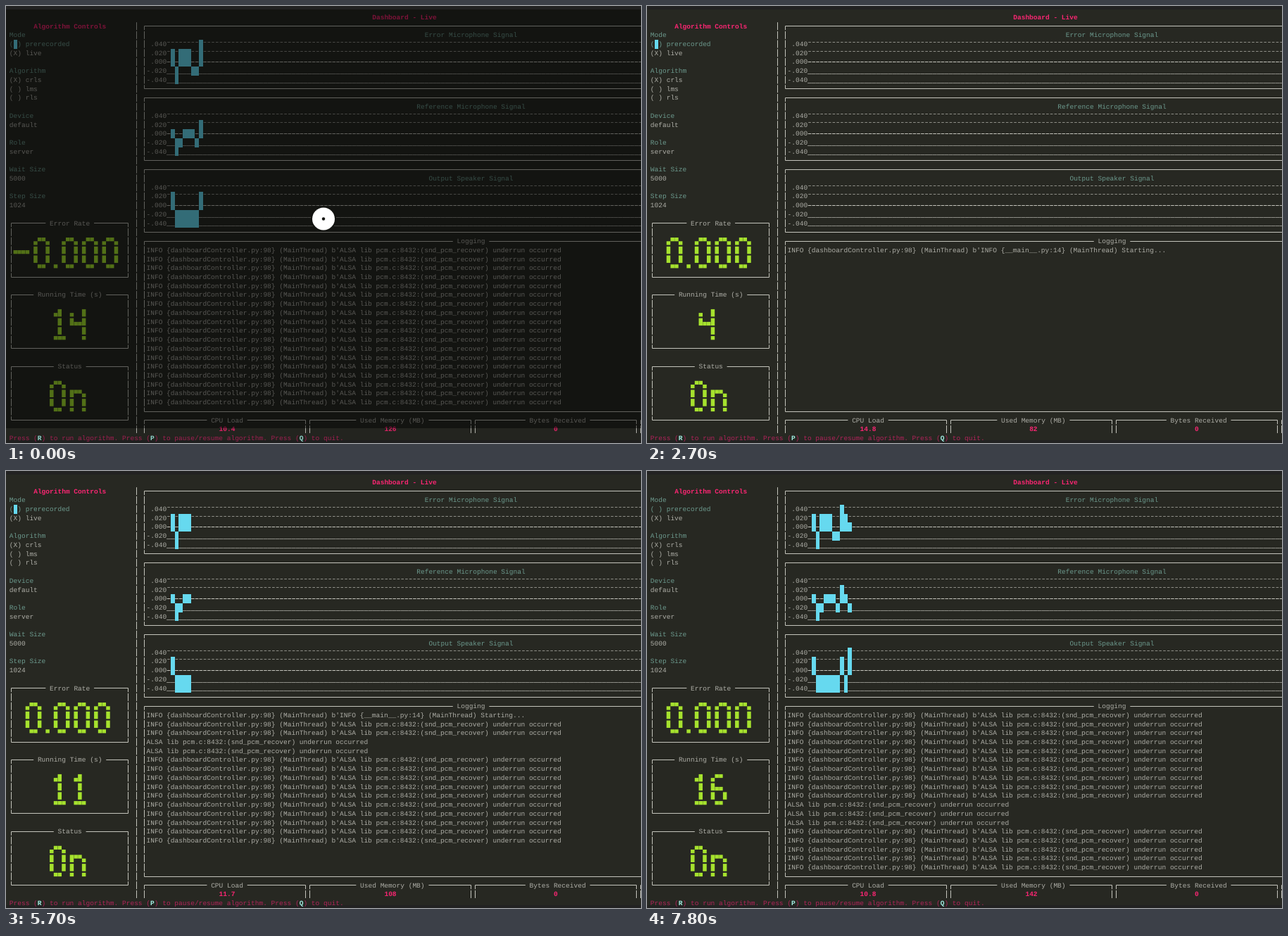
These frames come from a looping animation (902 by 621 pixels, 8000 ms). An HTML page:

```html
<!DOCTYPE html>
<html lang="en">
<head>
<meta charset="utf-8">
<title>Dashboard</title>
<style>
  html, body { margin: 0; width: 100%; height: 100%; overflow: hidden; background: #222; }
  svg { display: block; width: 902px; height: 621px; }
  text {
    font: 9.545px "Liberation Mono", "Courier New", monospace;
    text-rendering: geometricPrecision;
    white-space: pre;
    fill: #adada6;
  }
  .teal { fill: #6c998d; }
  .red { fill: #b0235a; }
  .head { fill: #f92672; font-weight: bold; }
  .key { fill: #a1efe4; font-weight: bold; }
  .line { stroke: #c4c4bc; fill: none; }
  .grid { stroke: #8e8e87; fill: none; }
  .cell { shape-rendering: crispEdges; }
</style>
</head>
<body>
<svg viewBox="0 0 902 621" xmlns="http://www.w3.org/2000/svg">
  <rect width="902" height="621" fill="#222"/>
  <rect y="5" width="902" height="612" fill="#272822"/>
  <g id="shell"></g>
  <g id="app"></g>
  <g id="panels"></g>
  <g id="live"></g>
  <g id="cursor"></g>
  <g id="poster">
    <rect y="5" width="902" height="595" opacity=".5"/>
    <rect y="600" width="902" height="21" opacity=".1"/>
    <circle cx="451" cy="302.5" r="18" fill="#131411"/>
    <circle cx="451" cy="302.5" r="16" fill="#fff"/>
    <circle cx="451" cy="302.5" r="2.2" fill="#131411"/>
  </g>
</svg>
<script>
const LOOP = 8000, W = 5.727, H = 12.73, LAST = 158;
const CYAN = '#66d9ef', GREEN = '#a6e22e', WHITE = '#f8f8f2';
const $ = id => document.getElementById(id);

// Terminal cell coordinates to pixels
const X = c => 4.8 + c * W;
const Y = r => 9.6 + r * H;
const snap = v => Math.floor(v) + 0.5;
const midX = c => snap(X(c + 0.5));
const midY = r => snap(Y(r + 0.5));

const text = (c, r, s, cls = '') =>
  `<text x="${X(c)}" y="${Y(r) + 9.2}" class="${cls}">${s}</text>`;
const rect = (x, y, w, h, fill, cls = '') =>
  `<rect x="${x}" y="${y}" width="${w}" height="${h}" fill="${fill}" class="${cls}"/>`;
const cells = (c, r, w, h, fill) => rect(X(c), Y(r), w * W, h * H, fill, 'cell');
const path = (d, cls = 'line', dash = '') =>
  `<path d="${d}" class="${cls}" stroke-dasharray="${dash}"/>`;

// One separate stroke per row, as a terminal draws it
function column(c, from, to) {
  let d = '';
  for (let r = from; r <= to; r++) d += `M${midX(c)} ${Y(r) + 0.8}V${Y(r) + 11.8}`;
  return path(d);
}

function frame(left, right, top, bottom, title, at) {
  const l = midX(left), rt = midX(right), t = midY(top), open = bottom > 46;
  let d = `M${l} ${Y(top) + 11.8}V${t}`;
  d += title ? `H${X(at - 1)}M${X(at + title.length + 1)} ${t}` : '';
  d += `H${rt}V${Y(top) + 11.8}`;
  if (!open) {
    const b = midY(bottom);
    d += `M${l} ${Y(bottom) + 0.8}V${b}H${rt}V${Y(bottom) + 0.8}`;
  }
  return path(d) + column(left, top + 1, bottom - 1) + column(right, top + 1, bottom - 1) +
    (title ? text(at, top, title) : '');
}

// Half-block glyphs, four rows each
const ring = '▄▀▀▄|█  █|█  █| ▀▀ ';
const GLYPHS = {
  '0': ring, O: ring,
  '1': ' ▄█ |  █ |  █ | ▀▀▀',
  '2': '▄▀▀▄|  ▄▀|▄▀  |▀▀▀▀',
  '3': '▄▀▀▄|  ▄▀|▄  █| ▀▀ ',
  '4': '▄  █|█▄▄█|   █|   ▀',
  '5': '█▀▀▀|█▄▄ |▄  █| ▀▀ ',
  '6': '▄▀▀ |█▄▄ |█  █| ▀▀ ',
  '7': '▀▀▀█|  ▐▌|  █ |  ▀ ',
  '8': '▄▀▀▄|▀▄▄▀|█  █| ▀▀ ',
  '9': '▄▀▀▄|▀▄▄█|   █| ▀▀ ',
  n: '    |█▀▀▄|█  █|▀  ▀',
  '-': '    |▄▄▄▄|    |    ',
  '.': ' | | |▀'
};
// Part of the cell: x, y, width, height
const BLOCKS = {
  '█': [0, 0, 1, 1], '▀': [0, 0, 1, 0.5], '▄': [0, 0.5, 1, 0.5],
  '▐': [0.5, 0, 0.5, 1], '▌': [0, 0, 0.5, 1]
};
const BW = 5.5, BH = 10.5;
const advance = ch => GLYPHS[ch].indexOf('|') + 1;

function big(str, row) {
  const width = [...str].reduce((sum, ch) => sum + advance(ch), 0);
  let col = 1 + Math.floor((28 - width) / 2), out = '';
  for (const ch of str) {
    GLYPHS[ch].split('|').forEach((line, j) => [...line].forEach((b, i) => {
      if (!BLOCKS[b]) return;
      const [x, y, w, h] = BLOCKS[b];
      out += rect(X(col + i) + x * W, Y(row + j) + 1.2 + y * BH, w * BW, h * BH, GREEN);
    }));
    col += advance(ch);
  }
  return out;
}

// Bars: first and last row of each column, counted from the .040 row
const PLOTS = [
  { top: 1, title: 'Error Microphone Signal', at: 103, bars: '12 34 12 12 12 33 33 02 12 22' },
  { top: 9, title: 'Reference Microphone Signal', at: 101, bars: '22 34 33 22 22 22 33 12 22 33' },
  { top: 17, title: 'Output Speaker Signal', at: 104, bars: '12 34 34 34 34 34 34 12 34 02' }
];

function plotFrame({ top, title, at }) {
  // Each dash is centred in its cell
  const row = (i, dy, cls, dash = W) =>
    path(`M${X(39) + (W - dash) / 2} ${snap(Y(top + 2 + i) + dy)}H902`, cls, `${dash} ${W - dash}`);
  const labels = [' .040', ' .020', ' .000', '-.020', '-.040'];
  return frame(33, LAST, top, top + 7) + text(at, top + 1, title, 'teal') +
    labels.map((s, i) => text(34, top + 2 + i, s)).join('') +
    row(0, 3.6, 'grid', 3.6) + row(1, 3.6, 'grid', 3.6) + row(2, 6.2, 'line', 4.6) +
    row(3, 10.6, 'grid') + row(4, 10.6, 'grid');
}

const plotBars = ({ top, bars }, count) =>
  bars.split(' ').slice(0, Math.max(0, count)).map(([a, b], i) =>
    cells(40 + i, top + 2 + +a, 1, b - a + 1, CYAN)).join('');

// Log lines by index
const INFO = 'INFO {dashboardController.py:98} (MainThread) b\'';
const ALSA = 'ALSA lib pcm.c:8432:(snd_pcm_recover) underrun occurred';
const RAW = [3, 4, 28, 29, 30];
const logLine = i => i === 0 ? INFO + 'INFO {__main__.py:14} (MainThread) Starting...'
  : RAW.includes(i) ? ALSA : INFO + ALSA;

function log(total) {
  const first = Math.max(0, total - 18);
  let out = '';
  for (let i = first; i < total; i++) out += text(34, 26 + i - first, logLine(i));
  return out;
}

// From second 4 on: error rate, CPU load, memory, log lines
const STATS = [
  ['0.000', '14.8', 82, 1], ['0.000', '14.4', 84, 1], ['0.000', '14.0', 86, 1],
  ['-0.000', '13.6', 88, 1], ['-0.000', '13.1', 93, 1], ['-0.000', '12.6', 98, 5],
  ['0.000', '12.1', 103, 10], ['0.000', '11.7', 108, 15], ['-0.000', '11.4', 114, 20],
  ['-0.000', '11.1', 120, 24], ['-0.000', '10.4', 126, 26], ['-0.000', '10.6', 134, 28],
  ['0.000', '10.8', 142, 36]
];

function live(sec) {
  const [error, cpu, mem, lines] = STATS[sec - 4];
  return big(error, 25) + big(String(sec), 33) + big('On', 41) +
    PLOTS.map(p => plotBars(p, sec - 6)).join('') + log(lines) +
    text(52, 46, cpu, 'head') + text(mem < 100 ? 94 : 93, 46, mem, 'head') +
    text(135, 46, '0', 'head');
}

const key = k => `(<tspan class="key">${k}</tspan>)`;
$('app').innerHTML =
  text(90, 0, 'Dashboard - Live', 'head') + text(6, 1, 'Algorithm Controls', 'head') +
  [[2, 'Mode'], [3, '( ) prerecorded'], [6, 'Algorithm'], [11, 'Device'], [14, 'Role'],
    [17, 'Wait Size'], [20, 'Step Size']].map(([r, s]) => text(0, r, s, 'teal')).join('') +
  [[4, '(X) live'], [7, '(X) crls'], [8, '( ) lms'], [9, '( ) rls'], [12, 'default'],
    [15, 'server'], [18, '5000'], [21, '1024']].map(([r, s]) => text(0, r, s)).join('') +
  column(31, 1, 46) +
  frame(0, 29, 23, 29, 'Error Rate', 10) +
  frame(0, 29, 31, 37, 'Running Time (s)', 7) +
  frame(0, 29, 39, 45, 'Status', 12) +
  text(0, 47, `Press ${key('R')} to run algorithm. Press ${key('P')} to pause/resume algorithm. ` +
    `Press ${key('Q')} to quit.`, 'red');

$('panels').innerHTML = PLOTS.map(plotFrame).join('') +
  frame(33, LAST, 25, 44, 'Logging', 111) +
  frame(33, 73, 45, 47, 'CPU Load', 50) +
  frame(74, 114, 45, 47, 'Used Memory (MB)', 87) +
  frame(115, 155, 45, 47, 'Bytes Received', 129) +
  frame(156, 196, 45, 47);

const COMMAND = '$ python3 -m anc --mode live --role server';

// What is on screen at time t
function stateAt(t) {
  if (t < 300) return { sec: 14, app: true, cursor: true, poster: true };
  if (t < 1200) return { typed: t < 600 ? 0 : t < 900 ? 30 : 42, cursor: t < 600 || t >= 900 };
  if (t < 2700) return { app: true, cursor: t < 1800 };
  const m = (t - 2700) % 1200;
  const sec = 4 + 3 * Math.floor((t - 2700) / 1200) + (m >= 600) + (m >= 900);
  return { sec, app: true, cursor: m < 300 || m >= 600 };
}

const show = (id, on) => { $(id).style.display = on ? '' : 'none'; };
let shown = '';

function draw() {
  const s = stateAt(performance.now() % LOOP);
  const id = JSON.stringify(s);
  if (id !== shown) {
    shown = id;
    show('app', s.app);
    show('panels', s.sec);
    show('poster', s.poster);
    $('live').innerHTML = s.sec ? live(s.sec) : '';
    $('shell').innerHTML = s.typed ? text(0, 0, COMMAND.slice(0, s.typed)) : '';
    $('cursor').innerHTML = !s.cursor ? '' :
      s.app ? cells(1, 3, 1, 1, CYAN) : cells(s.typed, 0, 1, 1, WHITE);
  }
  requestAnimationFrame(draw);
}
draw();
</script>
</body>
</html>
```
